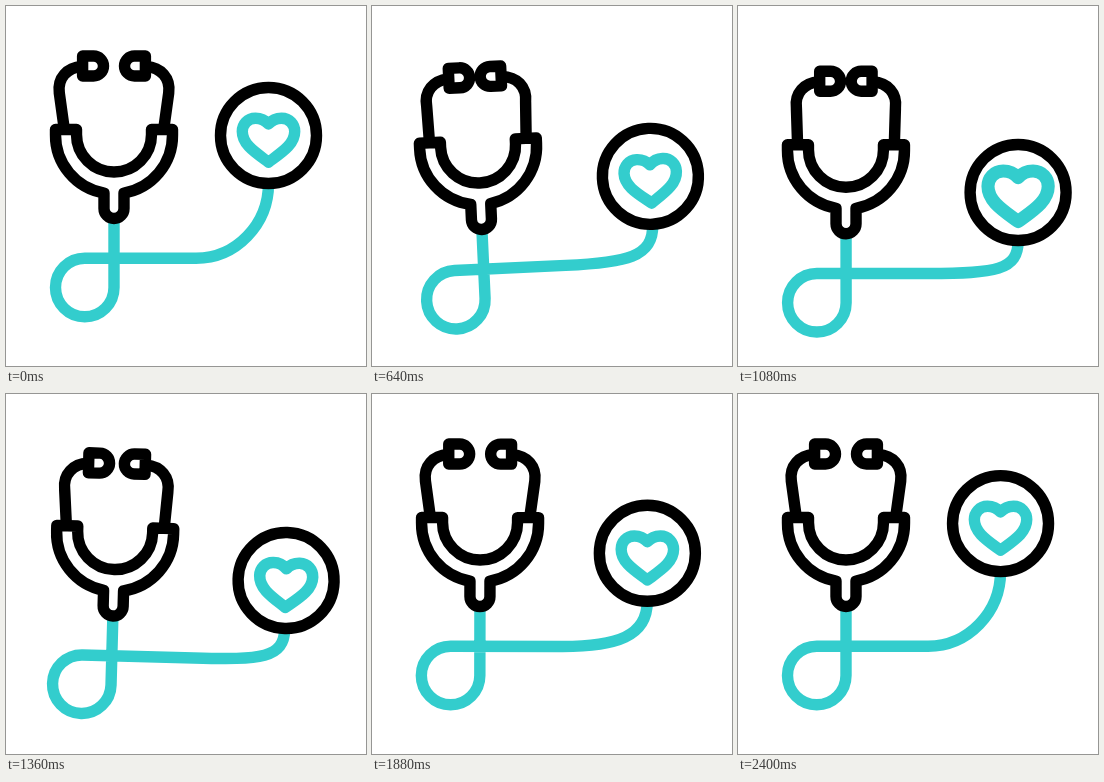
Recreate the animation shown at these times as an HTML page. Size 360 by 360 pixels, loop 2560 ms.

```html
<!DOCTYPE html>
<html lang="en">
<head>
<meta charset="utf-8">
<title>Stethoscope</title>
<style>
  html, body { margin: 0; width: 100%; height: 100%; overflow: hidden; background: #fff; }
  svg { display: block; width: 100%; height: 100%; }
</style>
</head>
<body>
<svg viewBox="0 0 360 360" fill="none" stroke="#000" stroke-width="11.4" stroke-linejoin="round" stroke-linecap="round">
  <path id="cable" stroke="#33cdcd" stroke-linecap="butt"/>
  <g id="body">
    <g>
      <path class="tube"/>
      <path class="ear" d="M76.6 50H87.5A10 10 0 0 1 87.5 70H76.6Z" fill="#fff"/>
    </g>
    <g transform="translate(216 0) scale(-1 1)">
      <path class="tube"/>
      <path class="ear" d="M76.6 50H87.5A10 10 0 0 1 87.5 70H76.6Z" fill="#fff"/>
    </g>
    <path fill="#fff" d="M49.5 123.5H70.5V128.5A37.5 37.5 0 0 0 145.5 128.5V123.5H166.5V129A58.5 58.5 0 0 1 118 187V202.5A10 10 0 0 1 98 202.5V187A58.5 58.5 0 0 1 49.5 129Z"/>
  </g>
  <g id="chest">
    <circle r="48" fill="#fff"/>
    <path id="heart" stroke="#33cdcd" d="M0 -11.5C-4 -16 -8.5 -17.3 -13 -17.3C-21 -17.3 -26.2 -11 -26.2 -4C-26.2 9 -13 17 0 26.7C13 17 26.2 9 26.2 -4C26.2 -11 21 -17.3 13 -17.3C8.5 -17.3 4 -16 0 -11.5Z"/>
  </g>
</svg>
<script>
const LOOP = 2560, STEP = 40;
const PIVOT = [108, 171];
const $ = id => document.getElementById(id);
const all = name => document.querySelectorAll("." + name);

// Sine ease from 0 to 1 between two times
function ramp(t, from, to) {
  const u = Math.min(1, Math.max(0, (t - from) / (to - from)));
  return .5 - .5 * Math.cos(Math.PI * u);
}

// Up from a to b, hold, down from c to d
const hump = (t, a, b, c, d) => ramp(t, a, b) - ramp(t, c, d);

function draw(t) {
  const drop = 16.5 * hump(t, 236, 900, 900, 1920);
  const tilt = 1.6 * hump(t, 1080, 1400, 1400, 1960) - 2.7 * hump(t, 200, 690, 690, 1120);
  const pinch = 5.2 * hump(t, 100, 600, 1140, 1640);
  const swing = hump(t, 100, 940, 1365, 2425);
  const beat = hump(t, 760, 1090, 1090, 1420);

  const angle = tilt * Math.PI / 180, sin = Math.sin(angle), cos = Math.cos(angle);
  const at = (x, y) => {
    const a = x - PIVOT[0], b = y - PIVOT[1];
    return `${PIVOT[0] + a * cos - b * sin} ${PIVOT[1] + drop + a * sin + b * cos}`;
  };

  $("body").setAttribute("transform", `translate(0 ${drop}) rotate(${tilt} ${PIVOT})`);
  const top = 53.3 + pinch;
  for (const tube of all("tube"))
    tube.setAttribute("d", `M${58 + pinch * .3} 121L${top} 87C${top - 2} 72 ${61 + pinch} 61.5 ${76 + pinch} 60.5`);
  for (const ear of all("ear"))
    ear.setAttribute("transform", `translate(${pinch} 0)`);

  // The chest piece follows a quarter of an ellipse
  const cx = 262.5 + 17.6 * Math.sin(swing * Math.PI / 2), cy = 129.5 + 57 * swing;
  $("chest").setAttribute("transform", `translate(${cx} ${cy}) rotate(${tilt})`);
  $("heart").setAttribute("transform", `translate(0 ${4 - beat}) scale(${1 + .15 * beat}) translate(0 -4)`);

  // Down from the yoke, round the loop, then across to the chest piece
  const below = k => `${cx - k * sin} ${cy + k * cos}`;
  $("cable").setAttribute("d",
    `M${at(108, 211)}L${at(108, 281.5)}A29.25 29.25 0 1 1 ${at(78.75, 252.25)}` +
    `L${at(190, 252.25)}C${at(230 + 28 * swing, 252.25)} ${below(89 - 11 * swing)} ${below(48)}`);
}

function frame(now) {
  draw(Math.floor(now % LOOP / STEP) * STEP);
  requestAnimationFrame(frame);
}
draw(0);
requestAnimationFrame(frame);
</script>
</body>
</html>
```
